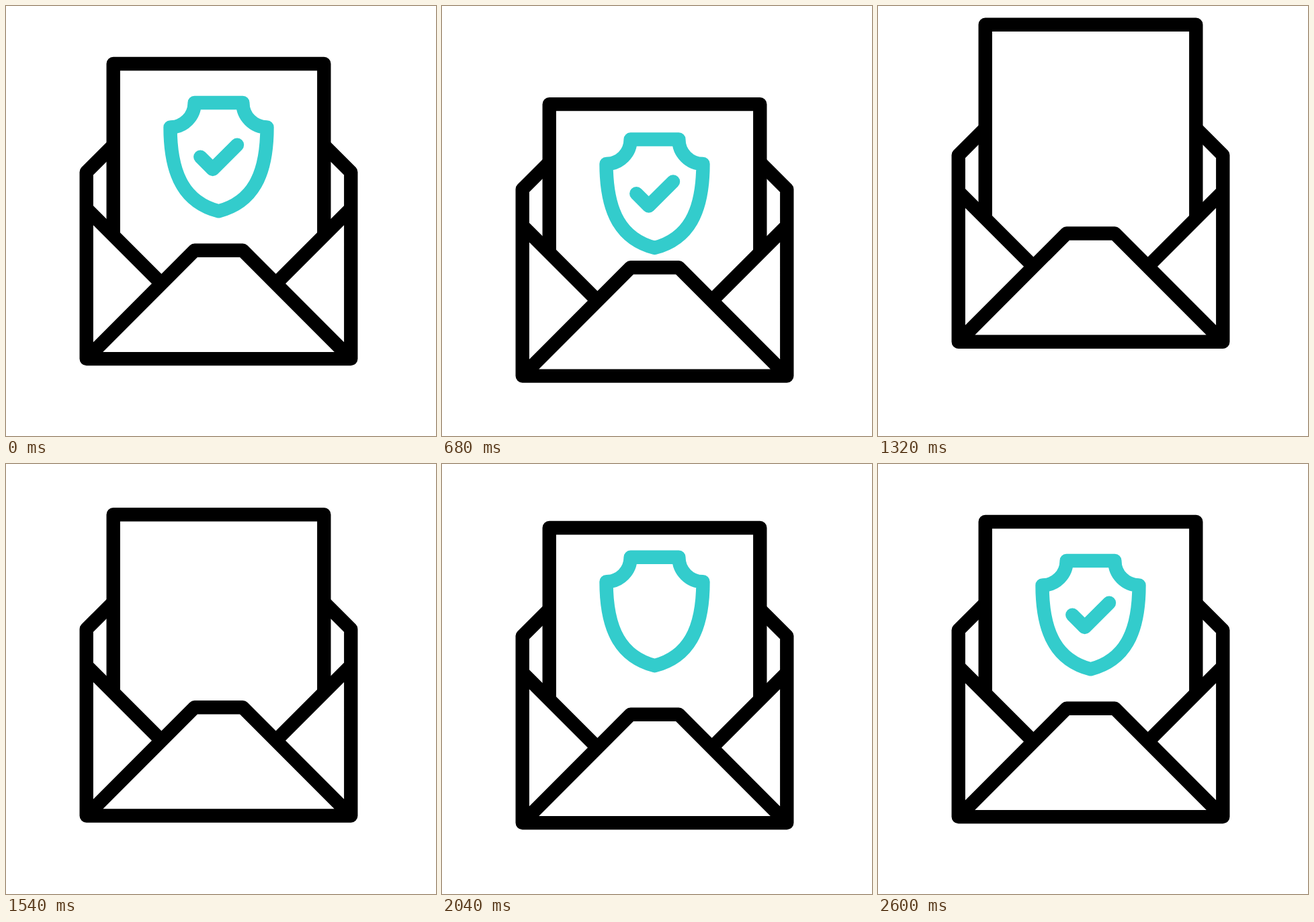
An HTML page that plays this animation: 640x640 px, repeating every 3000 ms.

```html
<!DOCTYPE html>
<html lang="en">
<head>
<meta charset="utf-8">
<title>Secure mail</title>
<style>
  html, body { margin: 0; width: 100%; height: 100%; overflow: hidden; background: #fff; }
  svg { display: block; width: 100vw; height: 100vh; }
  .line { fill: none; stroke: #000; stroke-width: 20.4; stroke-linecap: round; stroke-linejoin: round; }
  .teal { stroke: #33cccc; }
  .white { fill: #fff; }
</style>
</head>
<body>
<svg viewBox="0 0 640 640">
  <defs>
    <clipPath id="sheet"><path id="window" d="M159.7 86H473.3V470H159.7Z"/></clipPath>
  </defs>
  <g id="envelope">
    <g clip-path="url(#sheet)">
      <g id="shield">
        <path class="line teal" d="M280.6 144H352.4A36 36 0 0 0 388.5 180.4C388.5 253 366 292.5 316.5 305.4C267 292.5 244.5 253 244.5 180.4A36 36 0 0 0 280.6 144Z"/>
        <path id="check" class="line teal" pathLength="1" d="M289.3 224.6L307.7 243L344 206.8"/>
      </g>
    </g>
    <path id="paper" class="line" d="M159.7 460V86H473.3V460"/>
    <path class="white" d="M119.7 301.5L231.2 413L280.7 363.8H352.3L401.8 413L513.3 301.5V525H119.7Z"/>
    <path class="line" d="M157 210L119.7 247.3V525.1H513.3V247.3L476 210
      M119.7 301.5L231.2 413M513.3 301.5L401.8 413
      M119.7 525.1L280.7 363.8H352.3L513.3 525.1"/>
  </g>
</svg>
<script>
  const LOOP = 3000, STEP = 20;
  const SWING = 25.6;           // envelope travel up and down
  const LIFT = 1.5 * SWING;     // paper travel inside the envelope
  const SWAP = 1400;            // shield has left at the top, returns from below

  const el = id => document.getElementById(id);
  const shift = (id, y) => el(id).setAttribute('transform', `translate(0 ${y.toFixed(3)})`);

  // Smooth progress from 0 to 1 between two times.
  function glide(t, from, to) {
    const u = Math.min(1, Math.max(0, (t - from) / (to - from)));
    return u * u * (3 - 2 * u);
  }

  function draw(t) {
    const g = (from, to) => glide(t, from, to);

    shift('envelope', SWING * (g(200, 700) - 2 * g(700, 1300) + 2 * g(1300, 1800) - g(1800, 2200)));

    const paper = LIFT * (g(200, 600) - 2 * g(600, 1200) + g(1200, 1700));
    shift('paper', paper);
    shift('window', paper);

    const leaving = LIFT * g(200, 600) - 13 * SWING * g(600, SWAP);
    const entering = 261 - 275.6 * g(SWAP, 2000) + 14.6 * g(2000, 2400);
    shift('shield', t < SWAP ? leaving : entering);

    const drawn = t < SWAP ? 1 : g(2200, 2600);
    const check = el('check');
    check.style.visibility = drawn > 0 ? 'visible' : 'hidden';
    check.style.strokeDasharray = drawn < 1 ? `${drawn} 2` : 'none';
  }

  const start = performance.now();
  function tick() {
    const t = (performance.now() - start) % LOOP;
    draw(Math.floor(t / STEP) * STEP);
    requestAnimationFrame(tick);
  }
  tick();
</script>
</body>
</html>
```
